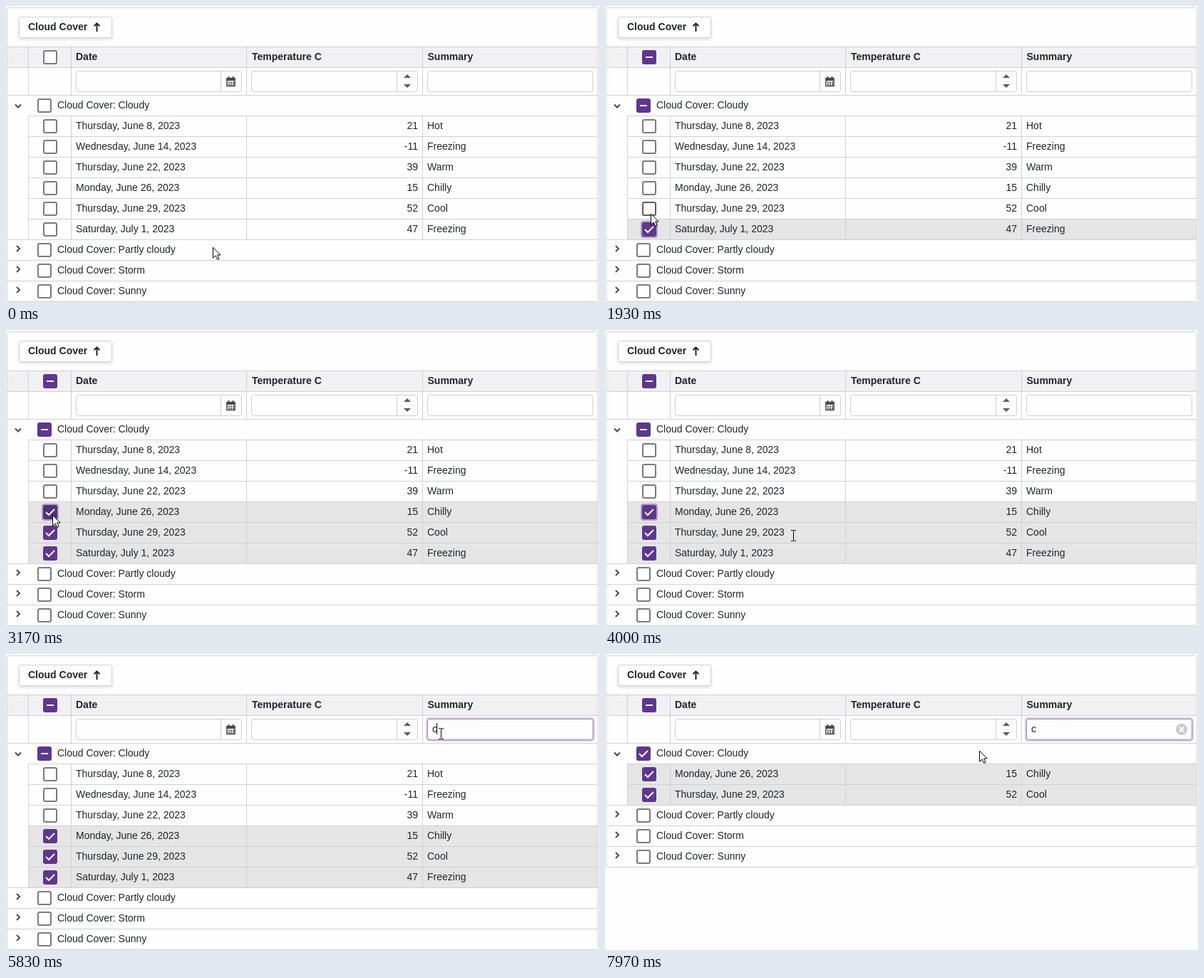
Recreate the animation shown at these times as an HTML page. Size 832x416 px, loop 8 s.

```html
<!DOCTYPE html>
<html lang="en">
<head>
<meta charset="utf-8">
<title>Grid selection</title>
<style>
html, body { margin: 0; width: 100%; height: 100%; overflow: hidden; background: #fefefe; }
svg { display: block; width: 832px; height: 416px; }
text { font: 14px "Liberation Sans", Arial, sans-serif; fill: #212529; white-space: pre; }
.b { font-weight: bold; }
.end { text-anchor: end; }
.line { stroke: #d1d1d1; fill: none; shape-rendering: crispEdges; }
.field { fill: #fefefe; stroke: #cfcfcf; }
.icon { fill: none; stroke: #4a4a4a; stroke-width: 2; }
.chip { fill: #fefefe; stroke: #d3d3d3; filter: drop-shadow(0 2px 2px rgba(0, 0, 0, .13)); }
</style>
</head>
<body>
<svg viewBox="0 0 832 416">
  <g id="grid"></g>
  <path id="arrow" fill="#fff" stroke="#000" stroke-linejoin="miter"
    d="M.5 1.2V16.3L4.2 12.9L6.6 18.4L9 17.4L6.7 11.9H11.2Z"/>
  <path id="beam" fill="none" stroke="#000" shape-rendering="crispEdges"
    d="M-3 -7.5H0M1 -7.5H4M.5 -7V7M-3 7.5H0M1 7.5H4"/>
</svg>
<script>
const LOOP = 8000, PURPLE = '#5f368d', PITCH = 29;
const COLS = [31, 91, 337, 584];
const ROWS = [
  ['Thursday, June 8, 2023', 21, 'Hot'],
  ['Wednesday, June 14, 2023', -11, 'Freezing'],
  ['Thursday, June 22, 2023', 39, 'Warm'],
  ['Monday, June 26, 2023', 15, 'Chilly'],
  ['Thursday, June 29, 2023', 52, 'Cool'],
  ['Saturday, July 1, 2023', 47, 'Freezing']
];
// Row index, mouse down, checked
const CLICKS = [[5, 1630, 1660], [4, 2330, 2370], [3, 3100, 3170]];
const FOCUS = 5070, TYPED = 5830, FILTERED = 6300;
const CARET = [[5070, 5630], [5830, 6400], [6930, 7430]];

// Time, x, y, easing into this point
const PATH = [
  [0, 290, 338], [500, 290, 338],
  [880, 190, 324, 'in'], [1270, 77, 314, 'out'], [1300, 73, 313], [1430, 64, 311, 'out'],
  [1680, 64, 311], [1930, 64, 291, 'both'], [2060, 64, 291], [2100, 64, 288],
  [2520, 64, 288], [2670, 65, 268, 'in'], [2800, 65, 259, 'out'],
  [3620, 65, 259], [3830, 150, 297, 'in'], [4000, 263, 289], [4430, 529, 202, 'out'],
  [4460, 529, 202], [4730, 600, 133, 'in'], [4900, 610, 112, 'out'],
  [7550, 610, 112], [7970, 525, 135, 'both'], [8000, 525, 135]
];
const EASE = {
  in: p => p ** 1.5,
  out: p => 1 - (1 - p) ** 1.5,
  both: p => p * p * (3 - 2 * p)
};

const grid = document.getElementById('grid');
const arrow = document.getElementById('arrow');
const beam = document.getElementById('beam');

const text = (x, y, s, cls = '') => `<text x="${x}" y="${y}" class="${cls}">${s}</text>`;
const line = d => `<path class="line" d="${d}"/>`;
const icon = d => `<path class="icon" d="${d}"/>`;
const rect = (x, y, w, h, more) => `<rect x="${x}" y="${y}" width="${w}" height="${h}" ${more}/>`;
const field = (x, w) => rect(x + .5, 91.5, w, 29, 'rx="3" class="field"');

function check(cx, cy, mark, { ring, hover } = {}) {
  const x = cx - 10, y = cy - 10;
  let s = ring ? rect(x - 2, y - 2, 24, 24, `rx="4" fill="${PURPLE}" opacity=".4"`) : '';
  if (!mark) {
    const edge = hover ? '#5c5c5c' : '#7b7b7b';
    return s + rect(x + 1, y + 1, 18, 18, `rx="2" fill="#fefefe" stroke="${edge}" stroke-width="2"`);
  }
  s += rect(x, y, 20, 20, `rx="3" fill="${hover ? '#51307a' : PURPLE}"`);
  const d = mark === 'some' ? `M${cx - 5} ${cy}h10` : `M${cx - 6} ${cy}l4 4l8 -8`;
  return s + `<path d="${d}" fill="none" stroke="#fff" stroke-width="2"/>`;
}

function header(mark, focused, typed, clear) {
  let s = rect(2, 58, 828, 28, 'fill="#f1f1f4"');
  s += rect(18.5, 15.5, 130, 29, 'rx="2" class="chip"') + text(31, 34, 'Cloud Cover', 'b');
  s += '<path d="M127.5 36V25M123.5 28.3L127.5 24.3L131.5 28.3" fill="none" stroke="#212529" stroke-width="2"/>';
  s += line('M1 57.5H830M1 86.5H830M1 125.5H830' + COLS.map(x => `M${x}.5 57V125`).join(''));
  s += check(62, 72, mark);
  s += text(98, 76, 'Date', 'b') + text(345, 76, 'Temperature C', 'b') + text(591.5, 76, 'Summary', 'b');

  s += field(98, 232) + line('M301.5 92V121');
  s += '<path d="M310 101.5H321V112.5H310Z" class="icon" style="stroke-width:1.6"/>' +
    rect(309.5, 101, 12, 4, 'fill="#4a4a4a"') +
    '<path d="M312.5 99V102M318.5 99V102M312 107.5h2m1 0h2m1 0h2M312 110.5h2m1 0h2m1 0h2" stroke="#4a4a4a" stroke-width="1.8"/>';
  s += field(344, 233) + line('M548.5 92V121');
  s += '<path d="M558 101L563 96L568 101ZM558 110L563 115L568 110Z" fill="#5b5b5b"/>';

  if (focused) s += rect(589, 89, 237, 34, `rx="5" fill="${PURPLE}" opacity=".25"`);
  s += focused ? rect(591.5, 91.5, 232, 29, 'rx="3" fill="#fefefe" stroke="#9c86b9"') : field(591, 232);
  if (typed) s += text(598, 110, 'c');
  if (clear) s += '<circle cx="809" cy="106" r="8" fill="#c9c9c9"/>' +
    '<path d="M805.5 102.5l7 7m0 -7l-7 7" stroke="#fff" stroke-width="2"/>';
  return s;
}

function group(y, name, open, mark) {
  const chevron = open ? `M13 ${y - 1.5}l4 4l4 -4` : `M15 ${y - 6}l4 4l-4 4`;
  return icon(chevron) + check(54, y, mark) + text(72, y + 4, 'Cloud Cover: ' + name);
}

function row(y, [date, temp, summary], mark, look) {
  const top = y - 15;
  return (mark ? rect(32, top + 1, 798, 28, 'fill="#e5e5e5"') : '') +
    line(`M31 ${top + .5}H830` + COLS.map(x => `M${x}.5 ${top}v${PITCH}`).join('')) +
    check(62, y, mark, look) +
    text(98, y + 4, date) + text(578, y + 4, temp, 'end') + text(591, y + 4, summary);
}

function scene(state) {
  const { picked, ring, hover, focused, typed, filtered, caret } = state;
  const shown = filtered ? [3, 4] : [0, 1, 2, 3, 4, 5];
  const some = picked.length ? 'some' : '';
  const bottom = 154 + PITCH * (shown.length + 3);
  let s = rect(1.5, 2.5, 829, bottom - 1 - 1, 'rx="3" fill="#fefefe" stroke="#d1d1d1"');
  s += header(some, focused, typed, filtered);
  s += group(140, 'Cloudy', true, filtered ? 'all' : some);
  let y = 169;
  for (const i of shown) {
    s += row(y, ROWS[i], picked.includes(i) ? 'all' : '', { ring: ring === i, hover: hover === i });
    y += PITCH;
  }
  for (const name of ['Partly cloudy', 'Storm', 'Sunny']) {
    s += line(`M1 ${y - 14.5}H830`) + group(y, name, false, '');
    y += PITCH;
  }
  if (caret) s += rect(typed ? 604 : 598, typed ? 97 : 98, 1, 16, 'fill="#000"');
  return s;
}

function pointer(t) {
  const i = Math.max(1, PATH.findIndex(k => k[0] > t));
  const [t0, x0, y0] = PATH[i - 1], [t1, x1, y1, ease] = PATH[i];
  let p = (t - t0) / (t1 - t0);
  if (ease) p = EASE[ease](p);
  return [Math.round(x0 + (x1 - x0) * p), Math.round(y0 + (y1 - y0) * p)];
}

function stateAt(t, x, y) {
  const down = CLICKS.filter(c => t >= c[1]);
  const over = Math.floor((y - 155) / PITCH);
  return {
    picked: CLICKS.filter(c => t >= c[2]).map(c => c[0]),
    ring: down.length && t < FOCUS ? down[down.length - 1][0] : -1,
    hover: x >= 52 && x < 72 && Math.abs(y - 169 - over * PITCH) <= 10 ? over : -1,
    focused: t >= FOCUS,
    typed: t >= TYPED,
    filtered: t >= FILTERED,
    caret: CARET.some(([a, b]) => t >= a && t < b)
  };
}

let last = '';
function draw() {
  const t = performance.now() % LOOP;
  const [x, y] = pointer(t);
  const state = stateAt(t, x, y);
  const key = JSON.stringify(state);
  if (key !== last) {
    grid.innerHTML = scene(state);
    last = key;
  }
  const overText = x >= 98 && x <= 270 && y > 155 && y < 327;
  const overInput = x >= 591 && y > 91 && y < 121;
  const typing = overText || overInput;
  arrow.style.display = typing ? 'none' : '';
  beam.style.display = typing ? '' : 'none';
  (typing ? beam : arrow).setAttribute('transform', `translate(${x} ${y})`);
  requestAnimationFrame(draw);
}
draw();
</script>
</body>
</html>
```
